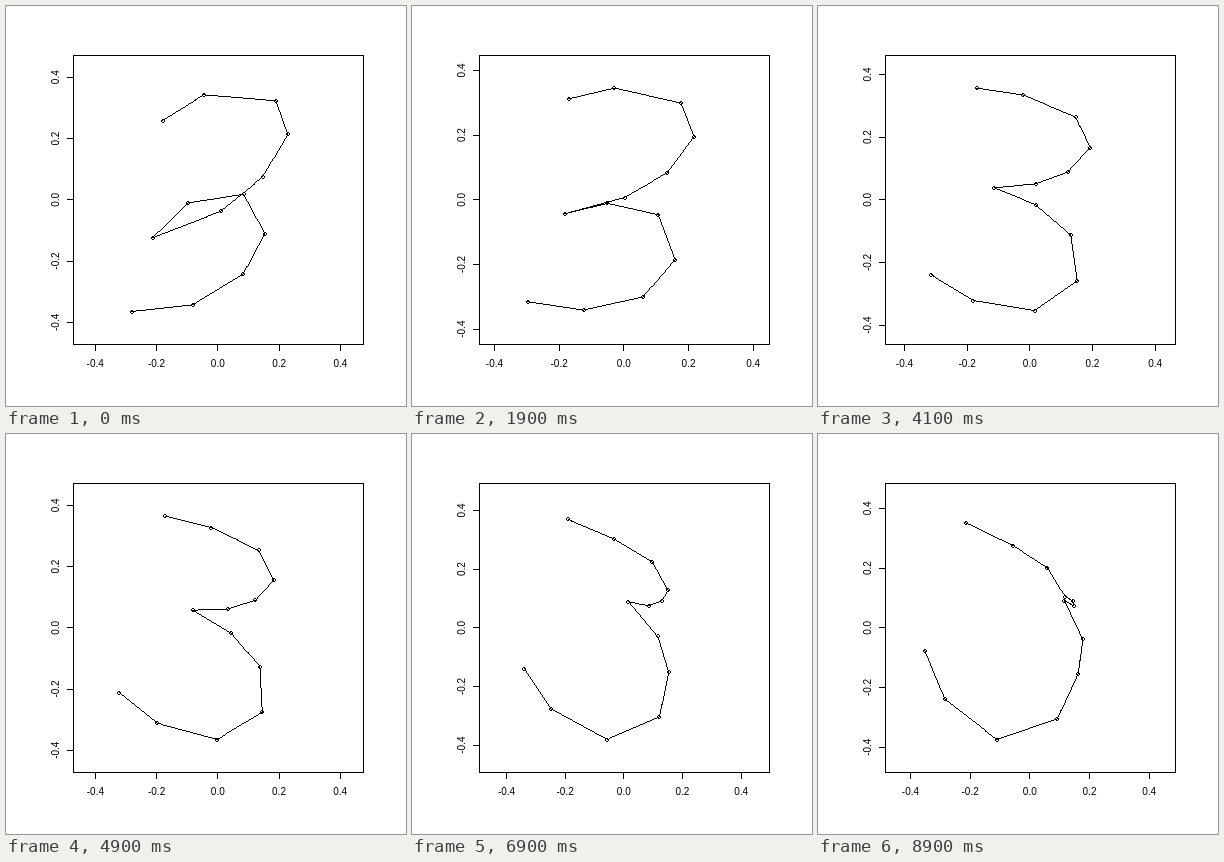
Animation of 400 by 400 pixels, one loop 9000 ms. Source, as an HTML page with a canvas:

```html
<!DOCTYPE html>
<html>
<head>
<meta charset="utf-8">
<style>
html, body { margin: 0; width: 100%; height: 100%; overflow: hidden; background: #fff; }
canvas { display: block; }
</style>
</head>
<body>
<canvas id="stage" width="400" height="400"></canvas>
<script>
const ctx = document.getElementById('stage').getContext('2d');
const CX = 211.8, CY = 193.8, REACH = 111.73, LAST = 88, MID = 40.5;

// Start, middle and end pose: x and y of twelve landmarks.
// The thirteenth keeps the centroid at zero.
const [from, via, to] = [
  [[-86, -25, 25.5, 47, 26, -29.5, -65, 3, 45, 70, 58, -14],
   [111.7, 105, 74, 34, -5.5, 3, 38, 11.5, -23, -65.5, -99, -105]],
  [[-99, -56.5, 5, 47.5, 41, 6, -35.5, 6, 38.5, 60.5, 46, -6.5],
   [75, 101, 111, 81, 35, 5, -12, -16, -28, -52, -83, -105]],
  [[-105, -85, -33, 27.5, 48.5, 53, 34.5, 44, 43, 35.5, 17.5, -16.5],
   [23, 71, 111.7, 91, 46, 11.5, -27, -22, -27, -31, -60, -82]]
].map(pose => unit(pose.flatMap(a => [...a, -a.reduce((p, q) => p + q)])));

function unit(v) {
  const size = Math.hypot(...v);
  return v.map(n => n / size);
}

// Unit-size shape on the parabola through the three poses, eased slightly.
function shapeAt(step) {
  const u = step - 2.2 * Math.sin(2 * Math.PI * step / LAST);
  const a = (u - MID) * (u - LAST) / (MID * LAST);
  const b = u * (LAST - u) / (MID * (LAST - MID));
  const c = u * (u - MID) / (LAST * (LAST - MID));
  return unit(from.map((p, i) => a * p + b * via[i] + c * to[i]));
}

function line([x0, y0], [x1, y1]) {
  const n = Math.ceil(Math.max(Math.abs(x1 - x0), Math.abs(y1 - y0), 1));
  for (let i = 0; i <= n; i++) {
    const x = x0 + (x1 - x0) * i / n, y = y0 + (y1 - y0) * i / n;
    ctx.fillRect(Math.floor(x), Math.floor(y), 1, 1);
  }
}

function ring(point) {
  const [x, y] = point.map(Math.round);
  ctx.fillRect(x - 1, y - 2, 2, 1);
  ctx.fillRect(x - 1, y + 1, 2, 1);
  ctx.fillRect(x - 2, y - 1, 1, 2);
  ctx.fillRect(x + 1, y - 1, 1, 2);
}

function axes(scale) {
  ctx.strokeRect(67.5, 49.5, 290, 289);
  for (let i = -2; i <= 2; i++) {
    const label = (i / 5).toFixed(1), off = i / 5 * scale;
    ctx.fillRect(Math.floor(CX + off), 339, 1, 6);
    ctx.fillRect(61, Math.floor(CY - off), 6, 1);
    ctx.fillText(label, CX + off, 361);
    ctx.save();
    ctx.translate(52.5, CY - off);
    ctx.rotate(-Math.PI / 2);
    ctx.fillText(label, 0, 0);
    ctx.restore();
  }
}

function draw(now) {
  const frame = Math.floor(now % 9000 / 100);
  const shape = shapeAt(frame > 47 ? frame - 1 : frame); // the middle shape holds twice as long
  const scale = REACH / Math.max(...shape.map(Math.abs));
  const points = shape.slice(0, 13).map((x, i) => [CX + x * scale, CY + shape[i + 13] * scale]);
  ctx.fillStyle = '#fff';
  ctx.fillRect(0, 0, 400, 400);
  ctx.fillStyle = '#000';
  ctx.font = '10px "Liberation Sans", Arial, sans-serif';
  ctx.textAlign = 'center';
  axes(scale);
  points.forEach(ring);
  points.slice(1).forEach((p, i) => line(points[i], p));
}

const start = performance.now();
function tick() {
  draw(performance.now() - start);
  requestAnimationFrame(tick);
}
tick();
</script>
</body>
</html>
```
